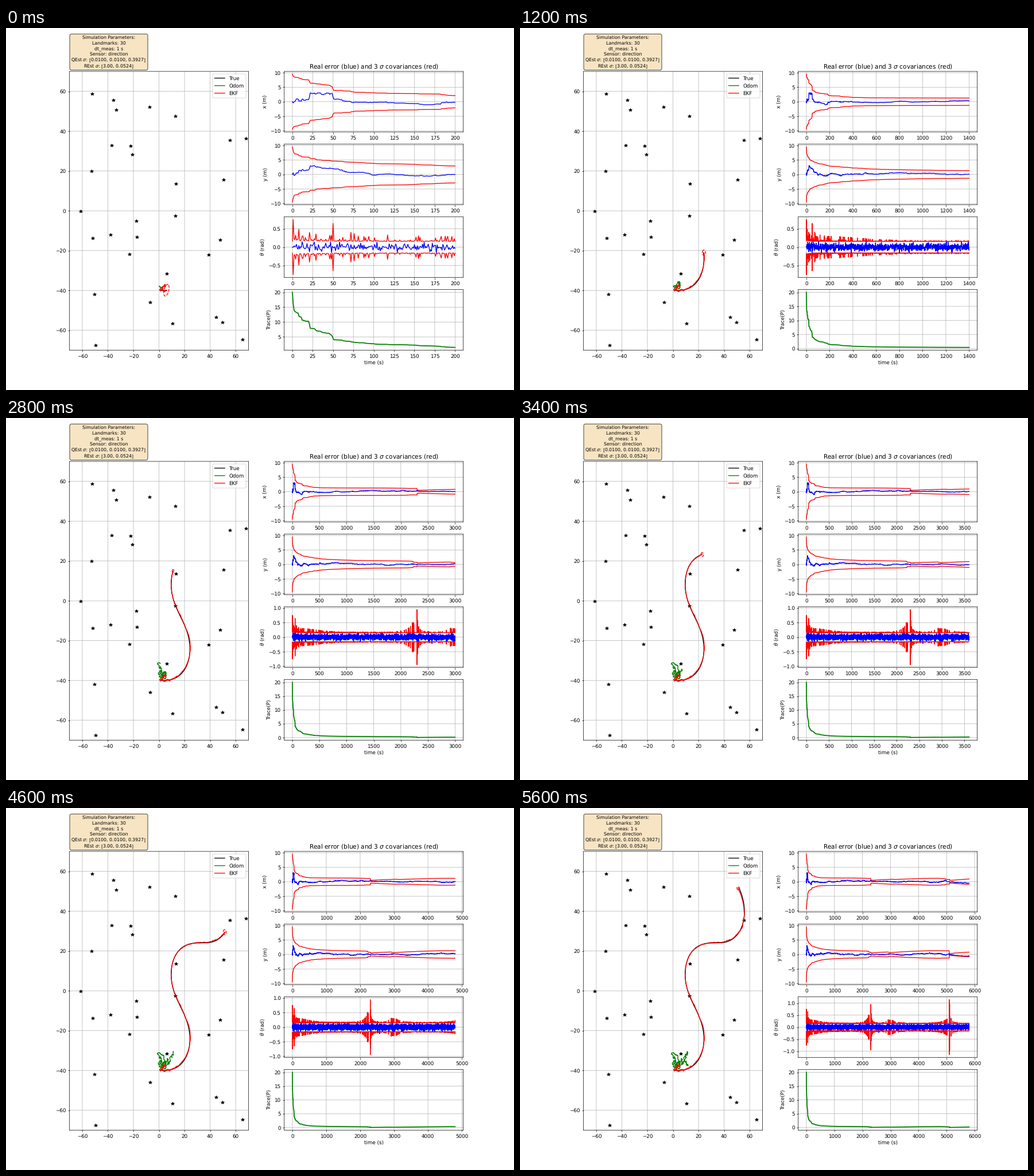
Recreate the animation shown at these times as a matplotlib script. Size 885 by 632 pixels, loop 5800 ms.

```python
from math import sin, cos, atan2, pi
import numpy as np
import matplotlib.pyplot as plt
from matplotlib.animation import FuncAnimation
from matplotlib.patches import FancyBboxPatch

FRAMES, STEP, INTERVAL = 29, 200, 200
N = FRAMES * STEP
T_END = 6000
SEED = 123456
WIDTH, HEIGHT = 885, 632

plt.rcParams.update({"text.hinting": "none", "path.snap": False})

q_sigma = np.array([0.01, 0.01, pi / 8])
r_sigma = np.array([3.0, 3 * pi / 180])
Q = np.diag(q_sigma ** 2)
marks = 140 * (np.random.RandomState(SEED).rand(2, 30) - 0.5)


def wrap(a):
    return (a + pi) % (2 * pi) - pi


def compose(pose, move):
    """Pose after a displacement given in the robot's own frame."""
    x, y, a = pose
    s, c = sin(a), cos(a)
    return np.array([x + c * move[0] - s * move[1],
                     y + s * move[0] + c * move[1], wrap(a + move[2])])


def control(k):
    return np.array([0, 0.025, np.radians(0.1) * sin(3 * pi * k / T_END)])


def bearing(pose, mark):
    dx, dy = mark - pose[:2]
    return wrap(atan2(dy, dx) - pose[2])


def predict(pose, P, move):
    s, c = sin(pose[2]), cos(pose[2])
    F = np.eye(3)
    F[:2, 2] = -s * move[0] - c * move[1], c * move[0] - s * move[1]
    G = np.array([[c, -s, 0], [s, c, 0], [0, 0, 1]])
    return compose(pose, move), F @ P @ F.T + G @ Q @ G.T


def correct(pose, P, z, mark):
    dx, dy = mark - pose[:2]
    d2 = dx * dx + dy * dy
    H = np.array([dy / d2, -dx / d2, -1])
    PH = P @ H
    gain = PH / (H @ PH + r_sigma[1] ** 2)
    pose = pose + gain * wrap(z - bearing(pose, mark))
    pose[2] = wrap(pose[2])
    P = P - np.outer(gain, PH)
    return pose, (P + P.T) / 2


def simulate():
    """Run the bearing-only filter; one row per second."""
    true = odom = est = np.array([1, -40, -pi / 2])
    P = 10 * np.diag([1, 1, (pi / 180) ** 2])
    rows = [(true, odom, est, P)]
    rng = np.random.RandomState()
    for k in range(1, N + 1):
        u = control(k)
        true = compose(true, u)
        rng.seed(2 * SEED + k)
        noise = q_sigma * rng.randn(3)
        odom = compose(compose(odom, u), noise)
        est, P = predict(est, P, u + noise)
        rng.seed(3 * SEED + k)
        mark = marks[:, rng.randint(0, marks.shape[1] - 1)]
        z = wrap(bearing(true, mark) + (r_sigma * rng.randn(2))[1])
        est, P = correct(est, P, z, mark)
        rows.append((true, odom, est, P))
    return [np.array(part) for part in zip(*rows)]


true, odom, est, cov = simulate()
t = np.arange(N + 1)
error = est - true
error[:, 2] = wrap(error[:, 2])
bound = 3 * np.sqrt(np.diagonal(cov, axis1=1, axis2=2))
trace = np.trace(cov, axis1=1, axis2=2)

fig = plt.figure(figsize=(14.003165, 10), dpi=63.2)
ax = fig.add_subplot(1, 2, 1)
ax.plot(*marks, "*k")
paths = [(ax.plot([], [], color, label=name)[0], pose)
         for color, name, pose in [("k", "True", true), ("g", "Odom", odom),
                                   ("r", "EKF", est)]]
ellipse, = ax.plot([], [], "--r")
ax.set(xlim=(-70, 70), ylim=(-70, 70))
ax.grid(True)
ax.legend(loc="upper right")

# Parameter box, laid out in stage pixels
pad = 2.4
fig.add_artist(FancyBboxPatch(
    (111 / WIDTH, 1 - 73.5 / HEIGHT), 136 / WIDTH, 63 / HEIGHT,
    boxstyle=f"round,pad=0,rounding_size={pad / HEIGHT}",
    mutation_aspect=WIDTH / HEIGHT, facecolor="wheat", edgecolor="k",
    alpha=0.8, transform=fig.transFigure))
y = 9.7
for text in ["Simulation Parameters:", "Landmarks: 30", "dt_meas: 1 s",
             "Sensor: direction", r"QEst $\sigma$: [0.0100, 0.0100, 0.3927]",
             r"REst $\sigma$: [3.00, 0.0524]"]:
    y += 10.7 if "$" in text else 9.6
    fig.text(179 / WIDTH, 1 - y / HEIGHT, text, fontsize=9, ha="center",
             va="baseline")

panels, plots = [], []


def panel(label, *series):
    p = fig.add_subplot(4, 2, 2 * len(panels) + 2)
    panels.append(p)
    for data, color, width in series:
        plots.append((p.plot([], [], color, lw=width)[0], data))
    p.set_ylabel(label)
    p.grid(True)


for j, label in enumerate(["x (m)", "y (m)", r"$\theta$ (rad)"]):
    panel(label, (error[:, j], "b", 1.5), (bound[:, j], "r", 1.5),
          (-bound[:, j], "r", 1.5))
panel("Trace(P)", (trace, "g", 2))
panels[0].set_title(r"Real error (blue) and 3 $\sigma$ covariances (red)")
panels[-1].set_xlabel("time (s)")

angle = np.arange(0, 2 * pi + 0.1, 0.1)
circle = np.array([np.sin(angle), np.cos(angle)])


def draw(i):
    n = (i + 1) * STEP
    for line, pose in paths:
        line.set_data(pose[:n + 1, 0], pose[:n + 1, 1])
    val, vec = np.linalg.eigh(cov[n, :2, :2])
    ring = 3 * vec @ (np.sqrt(val)[:, None] * circle)
    ellipse.set_data(est[n, 0] + ring[0], est[n, 1] + ring[1])
    for line, data in plots:
        line.set_data(t[:n + 1], data[:n + 1])
    for p in panels:
        p.relim()
        p.autoscale_view()
    return []


anim = FuncAnimation(fig, draw, frames=FRAMES, interval=INTERVAL,
                     init_func=lambda: draw(0), repeat=True, repeat_delay=0)
plt.show()
```
